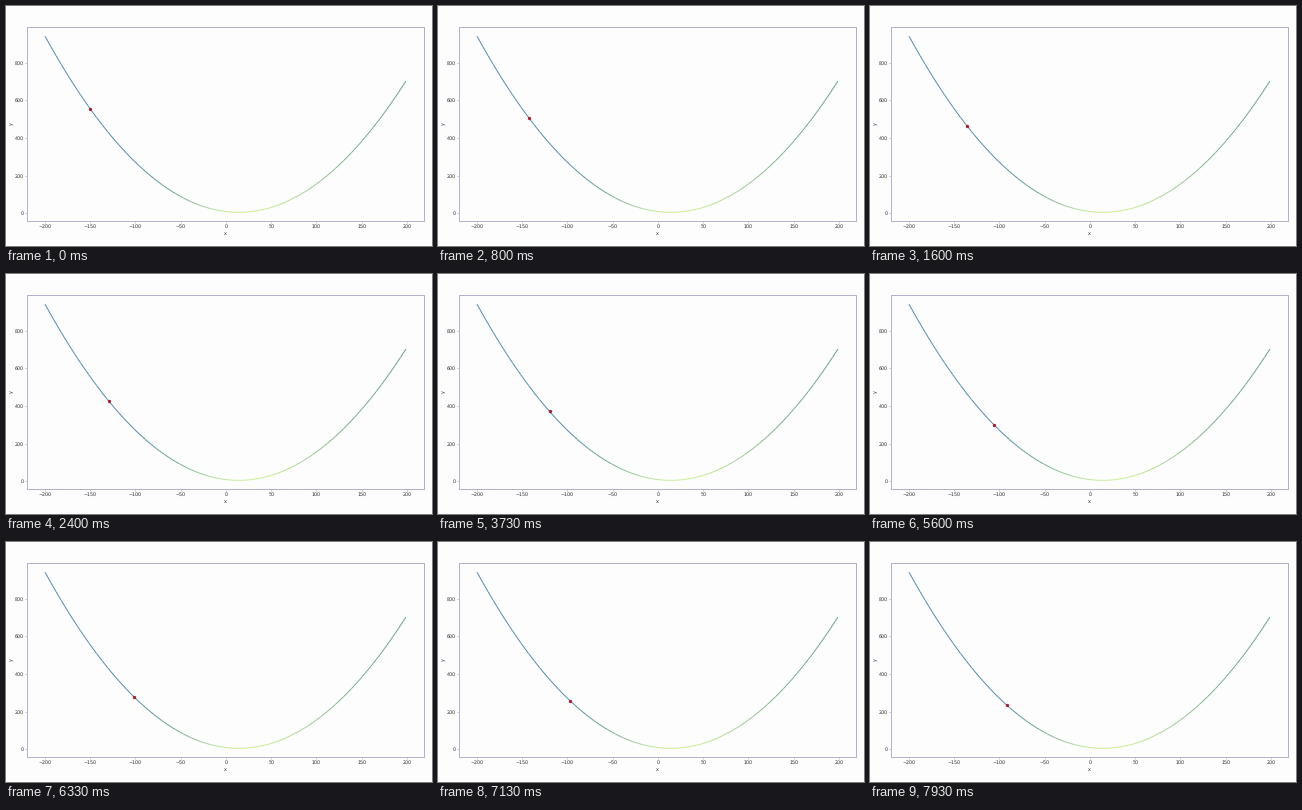
These frames come from a looping animation (426 by 240 pixels, 8 s). A matplotlib script:

```python
import numpy as np
import matplotlib.pyplot as plt
from matplotlib.animation import FuncAnimation
from matplotlib.collections import LineCollection
from matplotlib.colors import LinearSegmentedColormap

W, H, DPI = 426, 240, 34
FRAMES, LOOP_MS = 120, 8000
PX = 72 / DPI                       # one pixel in points
PAPER, FRAME, INK = "#fdfdfe", "#b2b2d0", "#2c2c34"

LOW_X, LOW_Y, CURVE = 14.1, 5.0, 0.0204
START, DECAY = -150.0, 0.99632      # gradient descent towards LOW_X

plt.rcParams.update({"font.family": "DejaVu Sans", "text.hinting": "none",
                     "text.color": INK, "axes.labelcolor": INK})


def f(x):
    return CURVE * (x - LOW_X) ** 2 + LOW_Y


def descent(step):
    return LOW_X + (START - LOW_X) * DECAY ** step


fig = plt.figure(figsize=(W / DPI, H / DPI), dpi=DPI, facecolor=PAPER)
left, right, top, bottom = 21, 418, 21, 215
ax = fig.add_axes([left / W, 1 - bottom / H, (right - left) / W, (bottom - top) / H],
                  facecolor=PAPER)
ax.set_xlim(-219.95, 218.95)
ax.set_ylim(-41, 989)
ax.set_xticks(range(-200, 201, 50))
ax.set_yticks(range(0, 801, 200))
ax.set_xlabel("x")
ax.set_ylabel("y", labelpad=2)
ax.tick_params(width=0.7 * PX, color=FRAME, labelcolor=INK)
for spine in ax.spines.values():
    spine.set(linewidth=PX, edgecolor=FRAME)

# blue on the steep arms, lime around the minimum
stops = [(-200, "#4a8ab0"), (-100, "#4a88a8"), (-55, "#62a888"), (-15, "#acdc94"),
         (15, "#c8f088"), (50, "#c4ec88"), (85, "#a4d488"), (130, "#78b088"),
         (199, "#649c90")]
shades = LinearSegmentedColormap.from_list(
    "arms", [((x + 200) / 399, c) for x, c in stops])
xs = np.linspace(-200, 199, 134)
pts = np.column_stack([xs, f(xs)])
curve = LineCollection(np.stack([pts[:-1], pts[1:]], axis=1), cmap=shades,
                       array=xs[:-1], linewidths=0.95 * PX, zorder=2)
ax.add_collection(curve, autolim=False)

dot, = ax.plot([], [], "o", color="#a81428", markersize=6, snap=False, zorder=3)


def draw(i):
    x = descent(i)
    dot.set_data([x], [f(x)])
    return dot,


anim = FuncAnimation(fig, draw, frames=FRAMES, init_func=lambda: draw(0),
                     interval=LOOP_MS / FRAMES, repeat=True, repeat_delay=0)
plt.show()
```
